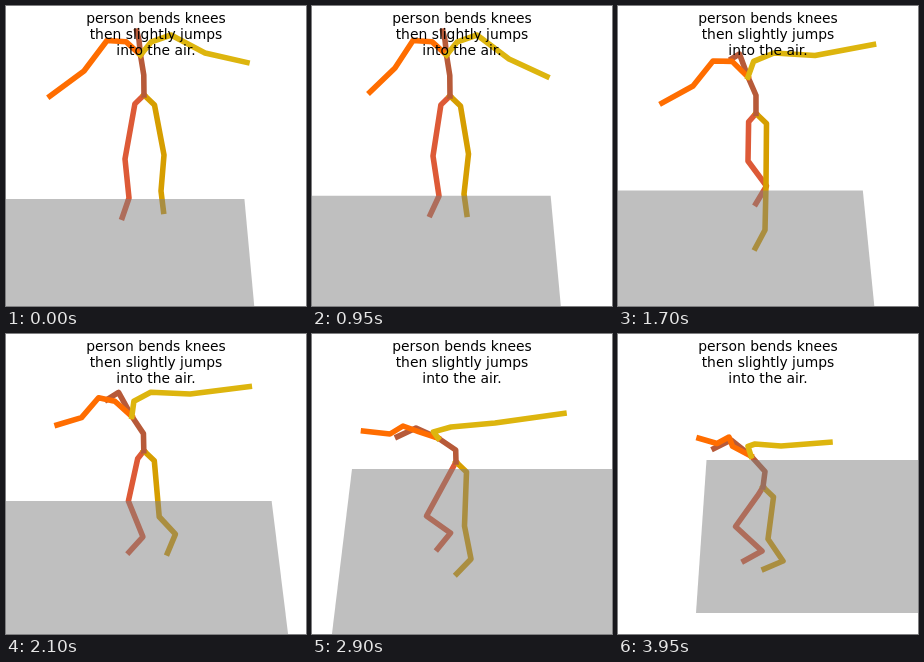
These frames come from a looping animation (300 by 300 pixels, 4000 ms). An HTML page:

```html
<!DOCTYPE html>
<html lang="en">
<head>
<meta charset="utf-8">
<title>Stick figure jump</title>
<style>
html, body { margin: 0; width: 100%; height: 100%; overflow: hidden; background: #fff; }
svg { display: block; width: 300px; height: 300px; }
polyline { fill: none; stroke-width: 5.56; stroke-linecap: square; stroke-linejoin: round; }
text { font: 13.89px "DejaVu Sans", sans-serif; text-anchor: middle; }
</style>
</head>
<body>
<svg viewBox="0 0 300 300">
  <g id="body"></g>
  <polygon id="floor" fill="#808080" fill-opacity=".5"/>
  <text x="150" y="17">person bends knees</text>
  <text x="150" y="33">then slightly jumps</text>
  <text x="150" y="49">into the air.</text>
</svg>
<script>
const LOOP = 4000, STEP = 50, FOOT = 20.5;

// Key poses: joints as [x, y], limbs listed from the trunk outwards,
// feet as degrees from straight down [right, left], floor as its left back corner.
const stand = {
  t: 0, hip: [138, 89], chest: [134.5, 49], neck: [133, 34],
  rKnee: [119, 153], rAnkle: [123, 192], lKnee: [158, 149], lAnkle: [155, 185],
  rShoulder: [101, 34.5], rElbow: [78, 65], rHand: [44, 90],
  lShoulder: [165, 29], lElbow: [199, 47], lHand: [241, 56.5],
  feet: [19, -7], floor: [-55, 193]
};
const sway = {
  ...stand, t: 950, hip: [138, 90],
  rKnee: [121, 150], rAnkle: [127, 190], lKnee: [156.5, 148], lAnkle: [152, 188],
  rElbow: [83, 62], rHand: [58, 86], lElbow: [197, 53], lHand: [235, 70.5],
  feet: [25, -8], floor: [-53.8, 189.8]
};
const lean = {
  t: 1700, hip: [138, 107.5], chest: [130, 71], neck: [121.5, 48],
  rKnee: [130, 155], rAnkle: [148.5, 180], lKnee: [148, 179], lAnkle: [147, 224],
  rShoulder: [95, 55], rElbow: [75, 80], rHand: [44, 97],
  lShoulder: [156, 47], lElbow: [197, 49.5], lHand: [255.5, 38.5],
  feet: [31, 28], floor: [-46, 184.5]
};
const stride = {
  t: 2450, hip: [138.5, 124], chest: [123, 92], neck: [105.5, 70],
  rKnee: [114.5, 178], rAnkle: [126, 221], lKnee: [158, 184], lAnkle: [186, 181.5],
  rShoulder: [91, 72.5], rElbow: [77, 87], rHand: [58, 86],
  lShoulder: [136, 70], lElbow: [174, 72.5], lHand: [233, 70.5],
  feet: [50, 18], floor: [8, 149.5]
};
const crouch = {
  t: 2900, hip: [144, 128], chest: [126, 104], neck: [104, 94],
  rKnee: [114.5, 182], rAnkle: [138.5, 199], lKnee: [152.5, 192], lAnkle: [159, 225],
  rShoulder: [91, 92], rElbow: [78, 100], rHand: [51.5, 97],
  lShoulder: [139, 93], lElbow: [183, 89], lHand: [252, 79.5],
  feet: [39, 44], floor: [40, 135]
};
const takeOff = {
  t: 3400, hip: [144, 110], chest: [126, 78], neck: [99, 59],
  rKnee: [117, 162], rAnkle: [157.5, 181], lKnee: [162.5, 170], lAnkle: [183, 187],
  rShoulder: [91, 62], rElbow: [80, 82], rHand: [63.5, 93],
  lShoulder: [121, 66], lElbow: [140, 91], lHand: [158, 113.5],
  feet: [34, 24], floor: [57, 123.3]
};
const landing = {
  t: 3950, hip: [145, 153], chest: [133, 122], neck: [113, 106],
  rKnee: [117.5, 192.5], rAnkle: [144, 217], lKnee: [150, 205], lAnkle: [165, 227],
  rShoulder: [111, 103], rElbow: [99, 109.5], rHand: [81, 104.3],
  lShoulder: [137, 110], lElbow: [163, 112], lHand: [212, 108.3],
  feet: [61, 67], floor: [88.5, 126]
};

// Top of the jump: on the way from take-off to landing, with the body lifted.
const apex = { t: 3550 };
for (const part of Object.keys(stand).slice(1)) {
  const lift = part === 'feet' || part === 'floor' ? 0 : 27;
  apex[part] = takeOff[part].map((a, i) =>
    a + (landing[part][i] - a) * 0.35 - i * lift);
}
const poses = [stand, sway, lean, stride, crouch, takeOff, apex, landing];

// Cubic Hermite through the poses, slopes taken from the neighbours.
function poseAt(t) {
  const last = poses.length - 1;
  let k = 0;
  while (k < last - 1 && t >= poses[k + 1].t) k++;
  const a = poses[k], b = poses[k + 1], d = b.t - a.t;
  const u = (t - a.t) / d, w = 1 - u, s = u * u * (3 - 2 * u);
  const slope = (n, part, i) => {
    const p = poses[Math.max(n - 1, 0)], q = poses[Math.min(n + 1, last)];
    return (q[part][i] - p[part][i]) / (q.t - p.t) * d;
  };
  const mix = (part, i) => a[part][i] + (b[part][i] - a[part][i]) * s
    + u * w * w * slope(k, part, i) - u * u * w * slope(k + 1, part, i);
  return Object.fromEntries(Object.keys(stand).slice(1)
    .map(part => [part, [mix(part, 0), mix(part, 1)]]));
}

const add = ([x, y], dx, dy) => [x + dx, y + dy];

function toe(ankle, degrees) {
  const a = degrees * Math.PI / 180;
  return add(ankle, -FOOT * Math.sin(a), FOOT * Math.cos(a));
}

// The small joints follow from how far the neck leans out from the chest.
function chains(p) {
  const nx = p.neck[0] - p.chest[0], ny = p.neck[1] - p.chest[1];
  const collarY = ny / 2 - 6 - 0.22 * nx;
  const waist = [(p.hip[0] + p.chest[0]) / 2 + 1 - 0.35 * nx, (p.hip[1] + p.chest[1]) / 2];
  const head = add(p.neck, 0.8 * nx - 1, 9 - 24 * Math.exp(nx / 5));
  return {
    '#DD5A37': [p.hip, add(p.hip, -9.5 - 0.25 * nx, 9 + 0.08 * nx),
      p.rKnee, p.rAnkle, toe(p.rAnkle, p.feet[0])],
    '#D69E00': [p.hip, add(p.hip, 10.5, 10),
      p.lKnee, p.lAnkle, toe(p.lAnkle, p.feet[1])],
    '#B75A39': [p.hip, waist, p.chest, p.neck, head],
    '#FF6D00': [p.chest, add(p.chest, 0.22 * nx - 14, collarY),
      p.rShoulder, p.rElbow, p.rHand],
    '#DDB50E': [p.chest, add(p.chest, 0.75 * nx + 12, collarY),
      p.lShoulder, p.lElbow, p.lHand]
  };
}

const body = document.getElementById('body');
const floor = document.getElementById('floor');
const lines = {};
for (const color of Object.keys(chains(stand))) {
  const line = document.createElementNS('http://www.w3.org/2000/svg', 'polyline');
  line.setAttribute('stroke', color);
  lines[color] = body.appendChild(line);
}

// The floor's sides meet at a far vanishing point.
const VANISH_X = 150, VANISH_Y = -770, WIDTH = 0.3047;

function drawFloor([left, back], t) {
  const front = 294 - (t - 3400) * 0.0273;
  const depth = back - VANISH_Y;
  const right = left + WIDTH * depth;
  const toFront = x => VANISH_X + (x - VANISH_X) * (front - VANISH_Y) / depth;
  floor.setAttribute('points',
    [left, back, right, back, toFront(right), front, toFront(left), front].join(' '));
}

function draw(t) {
  const p = poseAt(t);
  for (const [color, points] of Object.entries(chains(p)))
    lines[color].setAttribute('points', points.join(' '));
  drawFloor(p.floor, t);
}

const start = performance.now();
function tick() {
  const t = (performance.now() - start) % LOOP;
  draw(Math.floor(t / STEP) * STEP);
  requestAnimationFrame(tick);
}
tick();
</script>
</body>
</html>
```
